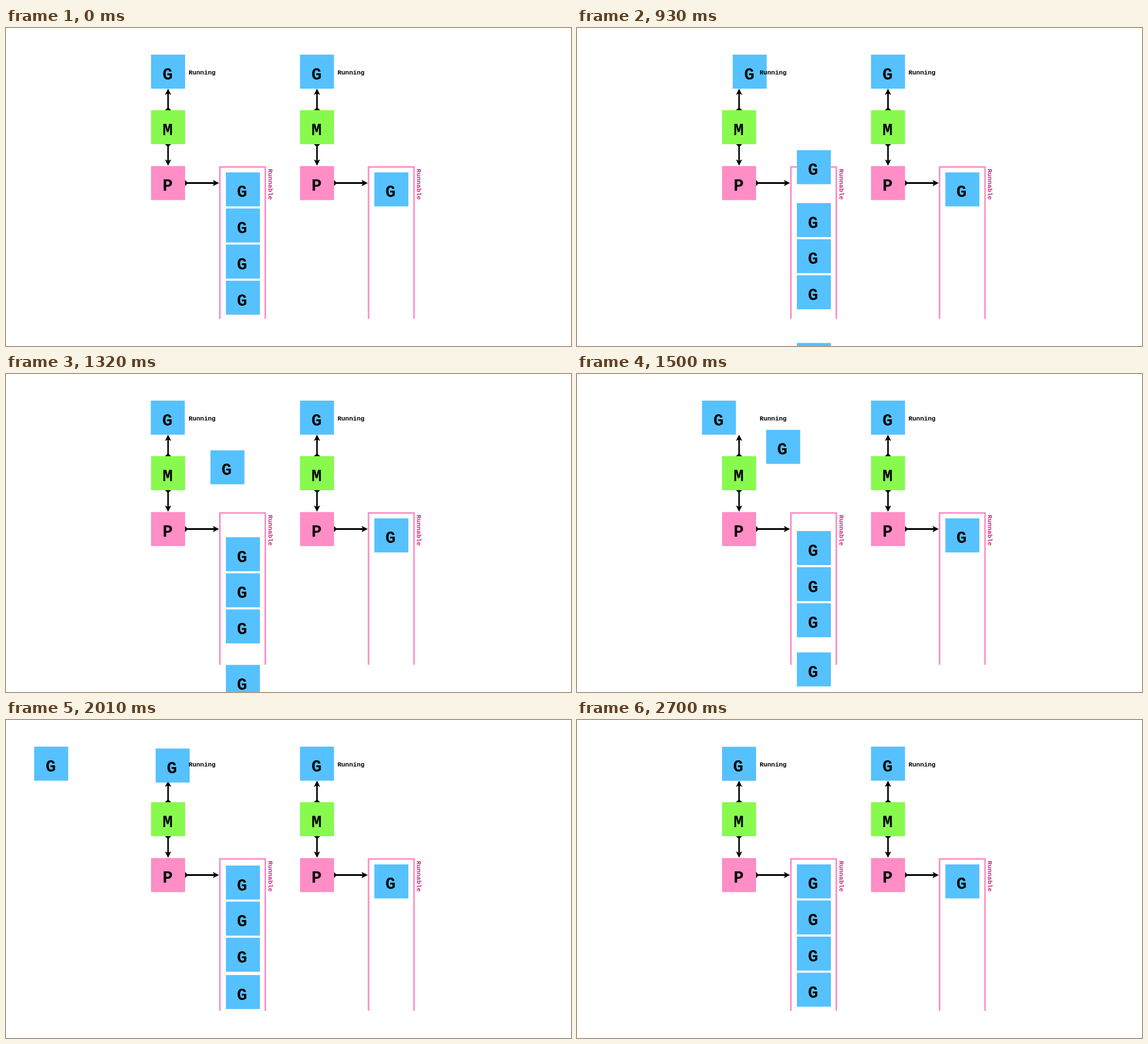
Recreate the animation shown at these times as an HTML page. Size 997 by 561 pixels, loop 2730 ms.

```html
<!DOCTYPE html>
<html lang="en">
<head>
<meta charset="utf-8">
<title>Run queues</title>
<style>
html, body { margin: 0; width: 100%; height: 100%; overflow: hidden; background: #fff; }
svg { display: block; width: 997px; height: 561px; }
text { font-family: "Liberation Mono", "DejaVu Sans Mono", monospace; font-weight: bold; }
.letter { font-size: 30px; text-anchor: middle; }
.label { font-size: 11.35px; }
</style>
</head>
<body>
<svg id="stage" viewBox="0 0 997 561"></svg>
<script>
const BLUE = '#56c1ff', GREEN = '#88fa4e', PINK = '#ff8dc6', MAGENTA = '#cb297b';
const LOOP = 2730, STEP = 30, START = 450, SPAN = 1785;
const PITCH = 63.7, QUEUE_Y = 254.7;
const stage = document.getElementById('stage');

function add(parent, tag, attrs, text) {
  const el = document.createElementNS('http://www.w3.org/2000/svg', tag);
  for (const key in attrs) el.setAttribute(key, attrs[key]);
  if (text) el.textContent = text;
  parent.appendChild(el);
  return el;
}

function place(el, x, y) {
  el.setAttribute('transform', `translate(${x.toFixed(2)} ${y.toFixed(2)})`);
}

function box(letter, fill, x, y, tx = 29.2, ty = 43.8) {
  const g = add(stage, 'g', {});
  add(g, 'rect', { width: 60, height: 60, fill });
  add(g, 'text', { x: tx, y: ty, class: 'letter' }, letter);
  place(g, x, y);
  return g;
}

function arrow(x, y, length, angle) {
  const g = add(stage, 'g', { transform: `translate(${x} ${y}) rotate(${angle})` });
  add(g, 'path', { d: `M0 0H${length - 6}`, stroke: '#000', 'stroke-width': 2.8 });
  add(g, 'path', { d: `M0 -5.5L5 0L0 5.5ZM${length} 0l-11 -5.5l2.5 5.5l-2.5 5.5Z` });
}

function processor(x, queueX) {
  arrow(x + 30, 145, 38, -90);
  arrow(x + 30, 205, 38, 90);
  arrow(x + 60, 273.5, queueX - x - 60, 0);
  box('M', GREEN, x, 145);
  box('P', PINK, x, 243.6, 29.2, 43);
  add(stage, 'path', {
    d: `M${queueX + 1.4} 513V245.2H${queueX + 81.6}V513`,
    fill: 'none', stroke: PINK, 'stroke-width': 2.8
  });
}

function labels(x, queueX) {
  add(stage, 'text', { x: x + 66.2, y: 82, class: 'label' }, 'Running');
  add(stage, 'text', {
    transform: `translate(${queueX + 87} 248.6) rotate(90)`, class: 'label', fill: MAGENTA
  }, 'Runnable');
}

processor(256, 376);
processor(518.8, 638.4);
box('G', BLUE, 518.8, 47);
box('G', BLUE, 650, QUEUE_Y, 28.4);

const leaving = box('G', BLUE, 256, 47);
const waiting = [1, 2, 3].map(i => box('G', BLUE, 388, QUEUE_Y + i * PITCH, 28.4));
const arriving = box('G', BLUE, 388, 575, 28.4);
const promoted = box('G', BLUE, 388, QUEUE_Y, 28.6);
labels(256, 376);
labels(518.8, 638.4);

// Cubic Bezier from 0 to 1 with inner values a and b
const bezier = (u, a, b) => 3 * u * (1 - u) ** 2 * a + 3 * u * u * (1 - u) * b + u ** 3;

function easeInOut(p) {
  if (p <= 0) return 0;
  if (p >= 1) return 1;
  let lo = 0, hi = 1;
  for (let i = 0; i < 24; i++) {
    const mid = (lo + hi) / 2;
    if (bezier(mid, 0.42, 0.58) < p) lo = mid; else hi = mid;
  }
  return bezier(lo, 0, 1);
}

// time, x, speed in px per ms: a drift right, then away to the left
const EXIT = [
  [450, 256, 0], [690, 262.6, 0.05], [1140, 273.4, -0.06], [1500, 220.5, -0.25],
  [1800, 132, -0.34], [2010, 49.7, -0.44], [2250, -66, -0.5]
];

function exitX(t) {
  if (t <= EXIT[0][0]) return EXIT[0][1];
  const i = EXIT.findIndex(k => k[0] > t);
  if (i < 0) return EXIT[EXIT.length - 1][1];
  const [t0, x0, v0] = EXIT[i - 1], [t1, x1, v1] = EXIT[i];
  const d = t1 - t0, u = (t - t0) / d, w = 1 - u;
  return x0 * w * w * (1 + 2 * u) + x1 * u * u * (3 - 2 * u) + d * u * w * (v0 * w - v1 * u);
}

function draw(t) {
  const e = easeInOut((t - START) / SPAN);
  place(leaving, exitX(t), 47);
  place(promoted, 388 - 132 * bezier(e, -0.07, 0.347),
    QUEUE_Y - 207.4 * bezier(e, 0.42, 0.854));
  waiting.forEach((g, i) => place(g, 388, QUEUE_Y + (i + 1 - e) * PITCH));
  place(arriving, 388, QUEUE_Y + 3 * PITCH + 129.2 * (1 - e));
}

const begin = performance.now();
function tick() {
  const t = (performance.now() - begin) % LOOP;
  draw(Math.floor(t / STEP) * STEP);
  requestAnimationFrame(tick);
}
draw(0);
requestAnimationFrame(tick);
</script>
</body>
</html>
```
